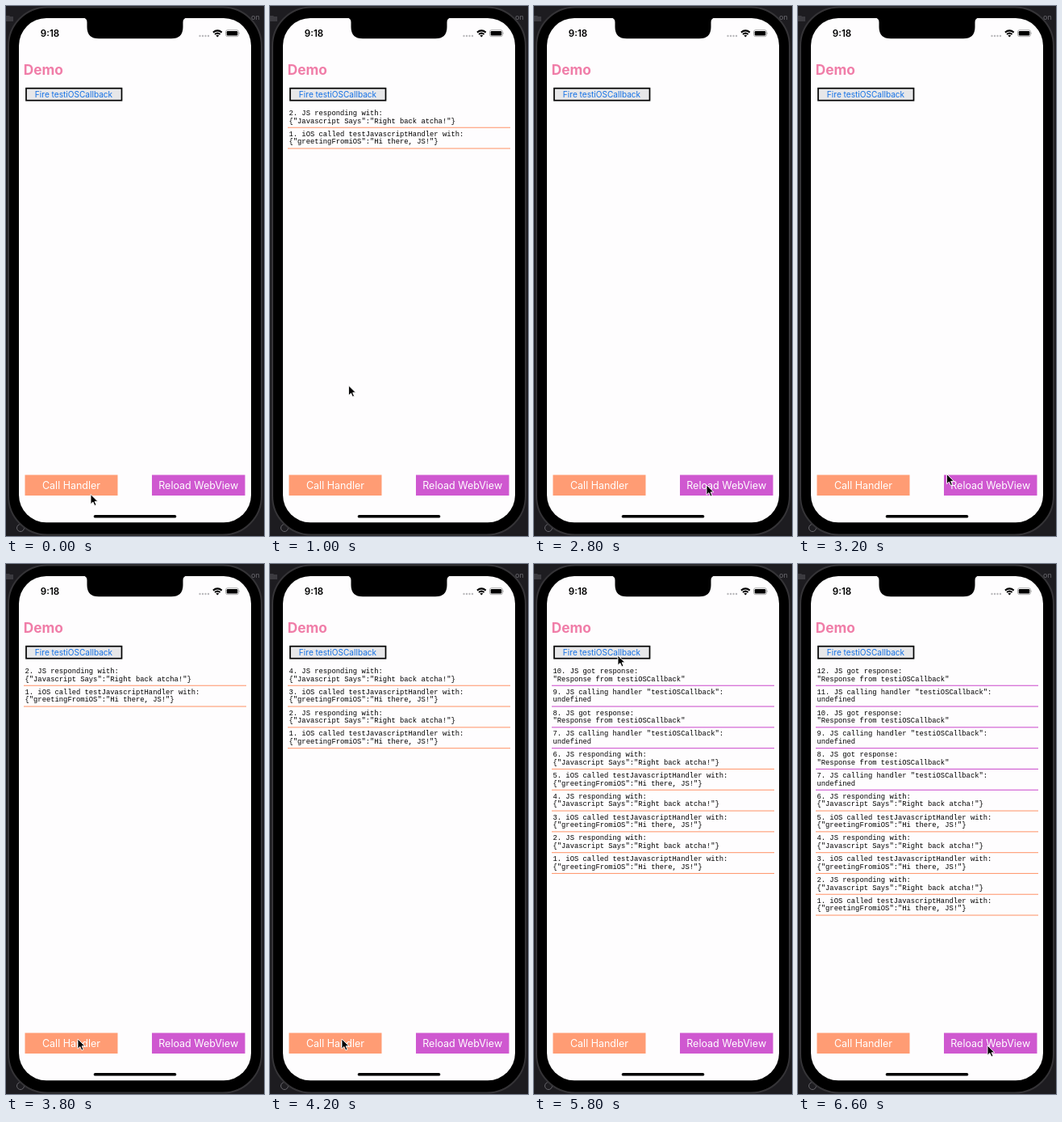
Recreate the animation shown at these times as an HTML page. Size 320x655 px, loop 7000 ms.

```html
<!DOCTYPE html>
<html lang="en">
<head>
<meta charset="utf-8">
<title>Bridge demo</title>
<style>
  html, body { margin: 0; width: 100%; height: 100%; overflow: hidden; background: #1d1c20; }
  svg { display: block; width: 320px; height: 655px; }
  text { font-family: Inter, "Liberation Sans", sans-serif; }
  .mid { text-anchor: middle; }
  .label { font-size: 12.5px; fill: #fff; }
  #log text { font: 8.82px "Liberation Mono", monospace; fill: #000; white-space: pre; }
</style>
</head>
<body>
<svg viewBox="0 0 320 655">
  <!-- desktop behind the phone -->
  <rect width="320" height="655" fill="#1d1c20"/>
  <path d="M0 12h4l1 1h4v6H0z" fill="#3c3b40"/>
  <text x="304" y="17" font-size="9" fill="#6a696e">on</text>
  <circle cx="18" cy="645" r="4.5" fill="none" stroke="#66656a"/>

  <!-- phone body -->
  <rect x="3" y="1.500" width="314" height="652" rx="48" fill="#000" stroke="#353437" stroke-width="2"/>
  <rect x="16" y="15" width="288" height="623.300" rx="34" fill="#fefdfe"/>
  <path d="M95.500 14.500Q100.500 15 100.500 20V26Q100.500 40.300 115 40.300H205Q219.500 40.300 219.500 26V20Q219.500 15 224.500 14.500Z" fill="#000"/>
  <rect x="108.700" y="628.900" width="102.600" height="3.700" rx="1.850" fill="#000"/>

  <!-- status bar -->
  <text class="mid" x="54.500" y="38" font-size="11.600" font-weight="600">9:18</text>
  <g fill="#b9b9bc">
    <circle cx="240.500" cy="37" r="1.200"/><circle cx="244" cy="37" r="1.200"/>
    <circle cx="247.500" cy="37" r="1.200"/><circle cx="251" cy="37" r="1.200"/>
  </g>
  <g fill="none" stroke="#000" stroke-width="2">
    <path d="M256.900 32.600Q262.300 28.200 267.700 32.600"/>
    <path d="M259 35Q262.300 32.300 265.600 35"/>
  </g>
  <path d="M260.400 36.400Q262.300 34.900 264.200 36.400L262.300 38.400Z"/>
  <rect x="272.500" y="29.700" width="16" height="8" rx="2.300" fill="none" stroke="#999" stroke-width=".8"/>
  <rect x="273.700" y="30.900" width="13.600" height="5.600" rx="1.300"/>
  <path d="M289.400 32.300q1.300 1.400 0 2.800z" fill="#999"/>

  <!-- page -->
  <text x="21.800" y="84.700" font-size="17.300" font-weight="700" fill="#f07da8">Demo</text>
  <rect x="25" y="101.700" width="118.500" height="15" fill="#e7e7e9" stroke="#000" stroke-width="1.700"/>
  <text class="mid" x="84" y="112.800" font-size="10.100" fill="#1672e6">Fire testiOSCallback</text>
  <g id="log"></g>

  <rect x="23.500" y="579.500" width="115" height="25.500" fill="#ff9c74"/>
  <text class="mid label" x="81" y="597">Call Handler</text>
  <rect x="181" y="579.500" width="115.500" height="25.500" fill="#cf58d0"/>
  <text class="mid label" x="238.700" y="597">Reload WebView</text>

  <path id="cursor" d="M0 0V12.200L2.900 9.500L4.900 14L7 13.100L5.100 8.800H8.900Z" fill="#000" stroke="#fff" stroke-width=".9" stroke-linejoin="round"/>
</svg>
<script>
const LOOP = 7000, STEP = 200, ROW = 25.8;
const ORANGE = '#ff9c74', PURPLE = '#cf58d0';

// click effects: what each button adds to the log, oldest first
const HANDLER = [
  ['iOS called testJavascriptHandler with:', '{"greetingFromiOS":"Hi there, JS!"}', ORANGE],
  ['JS responding with:', '{"Javascript Says":"Right back atcha!"}', ORANGE]
];
const FIRE = [
  ['JS calling handler "testiOSCallback":', 'undefined', PURPLE],
  ['JS got response:', '"Response from testiOSCallback"', PURPLE]
];
const RELOAD = null;
const clicks = [
  [600, HANDLER], [1600, FIRE], [2800, RELOAD],
  [3800, HANDLER], [4200, HANDLER], [4600, HANDLER],
  [5600, FIRE], [5800, FIRE], [6000, FIRE]
];

// time, x, y of the pointer tip
const path = [
  [0, 105, 603.5], [400, 96, 593], [800, 96, 593], [1400, 102, 115],
  [1800, 102, 115], [2600, 214, 592], [2800, 214, 592], [3200, 184.5, 578.5],
  [3600, 89, 587], [4600, 89, 587], [5200, 104, 113], [6000, 104, 113],
  [6600, 235, 595]
];

const log = document.getElementById('log');
const cursor = document.getElementById('cursor');

function add(name, attrs, text) {
  const el = document.createElementNS('http://www.w3.org/2000/svg', name);
  for (const key in attrs) el.setAttribute(key, attrs[key]);
  if (text) el.textContent = text;
  log.append(el);
}

function drawLog(done) {
  let entries = [];
  for (const [, added] of clicks.slice(0, done)) {
    entries = added ? entries.concat(added) : [];
  }
  log.replaceChildren();
  entries.forEach(([title, body, color], i) => {
    const y = 124.7 + (entries.length - 1 - i) * ROW;
    add('text', { x: 23.5, y: y + 10.3 }, `${i + 1}. ${title}`);
    add('text', { x: 23.5, y: y + 19.8 }, body);
    add('rect', { x: 22, y: y + 25, width: 276, height: 1.1, fill: color });
  });
}

function pointer(t) {
  const i = path.findIndex(p => p[0] > t);
  if (i < 0) return path[path.length - 1].slice(1);
  const [t0, x0, y0] = path[i - 1], [t1, x1, y1] = path[i];
  const u = (t - t0) / (t1 - t0), k = u * u * (3 - 2 * u);
  return [x0 + (x1 - x0) * k, y0 + (y1 - y0) * k];
}

let shown = -1;
function frame(now) {
  const t = Math.min(6600, Math.floor(now % LOOP / STEP) * STEP);
  const done = clicks.filter(c => c[0] <= t).length;
  if (done !== shown) drawLog(shown = done);
  cursor.setAttribute('transform', `translate(${pointer(t)})`);
  requestAnimationFrame(() => frame(performance.now() - start));
}
const start = performance.now();
frame(0);
</script>
</body>
</html>
```
